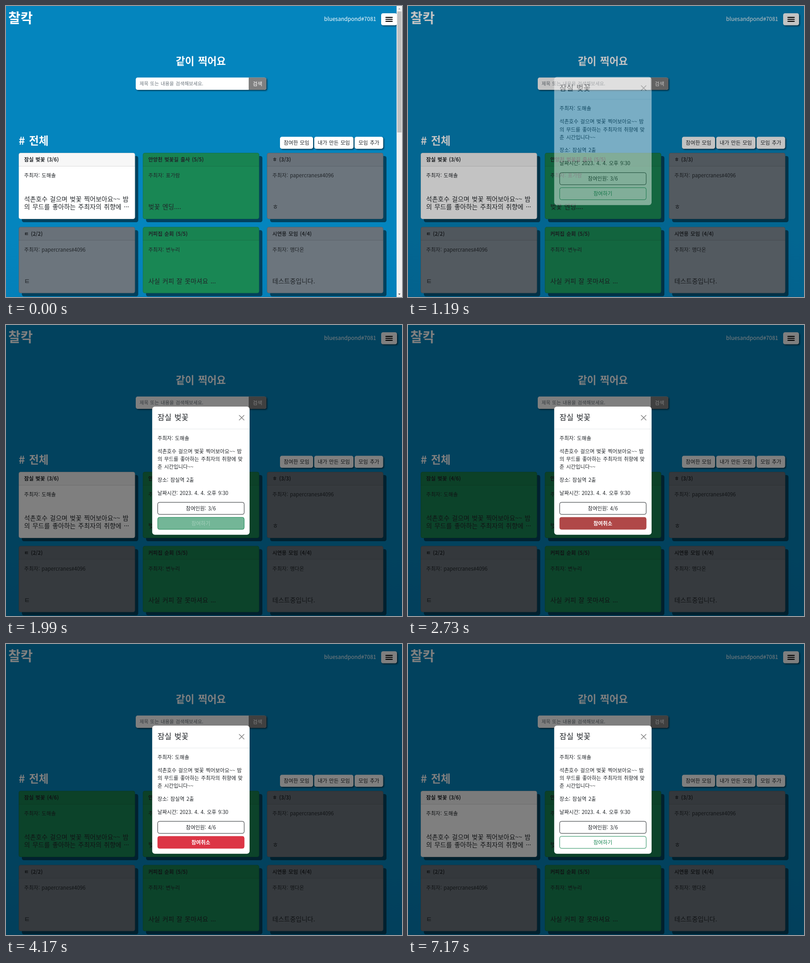
These frames come from a looping animation (873 px wide and 642 px high, 7.73 s). An HTML page:

```html
<!DOCTYPE html>
<html lang="ko">
<head>
<meta charset="utf-8">
<style>
  html, body { margin: 0; width: 100%; height: 100%; overflow: hidden; background: #0485be; }
  svg { display: block; width: 873px; height: 642px; }
  text { font-family: "Noto Sans CJK KR", "Noto Sans CJK", sans-serif; font-weight: 300; word-spacing: .1em; fill: #212529; }
  .bold { font-weight: 700; }
  .medium { font-weight: 600; }
  .white { fill: #fff; }
  .hint { fill: #6c757d; }
  .lifted { filter: drop-shadow(2px 2px 1.5px rgba(0, 0, 0, .55)); }
</style>
</head>
<body>
<svg id="stage" viewBox="0 0 873 642"></svg>
<script>
const LOOP = 7730, STEP = 70;
const GREEN = [25, 135, 84], RED = [220, 53, 69], DARK = [33, 37, 41], WHITE = [255, 255, 255];
const GREY_FILL = '#6c757d', GREEN_FILL = '#198754';
const SMALL = 11.3, BODY = 14;
const HOST = '도해솔', ME = 'bluesandpond#7081', FRIEND = 'papercranes#4096';
const $ = id => document.getElementById(id);

// y is the vertical centre of the glyphs
const text = (x, y, size, label, cls = '', anchor = 'start', id = '') =>
  `<text x="${x}" y="${y + size * .37}" font-size="${size}" text-anchor="${anchor}" class="${cls}" id="${id}">${label}</text>`;
const rect = (x, y, w, h, r, fill, extra = '') =>
  `<rect x="${x}" y="${y}" width="${w}" height="${h}" rx="${r}" fill="${fill}" ${extra}/>`;

const pill = (x, w, label) =>
  rect(x, 288.5, w, 26.5, 4.3, '#fff', 'class="lifted"') + text(x + w / 2, 301.5, SMALL, label, '', 'middle');

function card(x, y, fill, title, host, lines, id) {
  const body = lines.map((line, i) => text(x + 12, y + 119 - 17.5 * (lines.length - 1 - i), BODY, line)).join('');
  return rect(x + 7, y + 7, 256.5, 146, 4.5, 'rgba(0,0,0,.5)') +
    rect(x, y, 256.5, 146, 4.5, fill, `id="${id}Face"`) +
    `<path d="M${x} ${y + 29.5}v-25q0-4.5 4.5-4.5h247.5q4.5 0 4.5 4.5v25z" fill="rgba(0,0,0,.03)"/>` +
    rect(x, y + 29, 256.5, .75, 0, 'rgba(0,0,0,.176)') +
    rect(x + .4, y + .4, 255.7, 145.2, 4.1, 'none', 'stroke="rgba(0,0,0,.176)" stroke-width=".75"') +
    text(x + 12, y + 15, SMALL, title, 'medium', 'start', `${id}Title`) +
    text(x + 12, y + 50, SMALL, `주최자: ${host}`) + body;
}

const button = (id, y) =>
  rect(334.4, y, 190.7, 26.6, 4, '#fff', `id="${id}"`) +
  text(429.5, y + 13.3, SMALL, '', '', 'middle', `${id}Label`);

const backdrop = `<linearGradient id="sky" x2="0" y2="1"><stop offset=".8" stop-color="#0485be"/>
  <stop offset="1" stop-color="#0480b9"/></linearGradient>` + rect(0, 0, 873, 642, 0, 'url(#sky)');

const page = backdrop +
  text(5, 26, 29.3, '찰칵', 'bold white') +
  text(816, 29, 12, ME, 'white', 'end') +
  rect(827, 16, 35, 26.5, 4.3, '#fff', 'class="lifted"') +
  '<path d="M837.5 25.2h14M837.5 29.5h14M837.5 33.8h14" stroke="#000" stroke-width="2.2" stroke-linecap="round"/>' +
  text(429.5, 122, 22.2, '같이 찍어요', 'bold white', 'middle') +
  `<g class="lifted">${rect(286, 157.7, 288, 27.2, 4.3, '#fff')}<path d="M535 157.7h34.7q4.3 0 4.3 4.3v18.6q0 4.3-4.3 4.3h-34.7z" fill="#808080"/></g>` +
  text(294.5, 171.5, 10.5, '제목 또는 내용을 검색해보세요.', 'hint') +
  text(554.5, 171.5, SMALL, '검색', 'white', 'middle') +
  text(28, 297, 23.4, '# 전체', 'bold white') +
  pill(604, 73, '참여한 모임') + pill(679.5, 86.5, '내가 만든 모임') + pill(768.5, 63, '모임 추가') +
  card(28, 324, '#fff', '', HOST, ['석촌호수 걸으며 벚꽃 찍어보아요~~ 밤', '의 무드를 좋아하는 주최자의 취향에 ···'], 'first') +
  card(301.7, 324, GREEN_FILL, '안양천 벚꽃길 출사 (5/5)', '표가람', ['벚꽃 엔딩....']) +
  card(575.3, 324, GREY_FILL, 'ㅎ (3/3)', FRIEND, ['ㅎ']) +
  card(28, 487.5, GREY_FILL, 'ㅌ (2/2)', FRIEND, ['ㅌ']) +
  card(301.7, 487.5, GREEN_FILL, '커피집 순회 (5/5)', '변누리', ['사실 커피 잘 못마셔요 ...']) +
  card(575.3, 487.5, GREY_FILL, '시연용 모임 (4/4)', '맹다온', ['테스트중입니다.']);

const scrollbar = `<g id="scrollbar">${rect(861, 0, 12, 642, 0, '#f1f1f1')}${rect(862.5, 12, 9.5, 267, 0, '#c1c1c1')}
  <path d="M864.7 7.5l2.5-3 2.5 3z" fill="#a3a3a3"/><path d="M864.7 634.5l2.5 3 2.5-3z" fill="#505050"/></g>`;

const modal = `<g id="modal">` +
  rect(322.3, 180, 214.7, 282.7, 5.8, '#fff') +
  rect(322.5, 229, 214, .75, 0, '#dee2e6') +
  text(334, 204, 16.8, '잠실 벚꽃') +
  '<path d="M514.2 199.2l10.6 10.6m0-10.6l-10.6 10.6" stroke="#7f7f7f" stroke-width="1.4" stroke-linecap="round"/>' +
  [[249.5, `주최자: ${HOST}`], [278.5, '석촌호수 걸으며 벚꽃 찍어보아요~~ 밤'], [296, '의 무드를 좋아하는 주최자의 취향에 맞'],
   [313, '춘 시간입니다~~'], [341.5, '장소: 잠실역 2출'], [370.5, '날짜시간: 2023. 4. 4. 오후 9:30']]
    .map(([y, line]) => text(334, y, SMALL, line)).join('') +
  button('count', 391.2) + button('action', 424.3) + '</g>';

$('stage').innerHTML = page + scrollbar + rect(0, 0, 873, 642, 0, '#000', 'id="shade"') + modal + '<g id="tip"></g>';

function tooltip(names) {
  const width = names.includes(ME) ? 106 : 96, height = names.length * 15 + 6;
  return rect(329 - width, 404 - height / 2, width, height, 4.3, '#000') +
    '<path d="M329 399.7l4.3 4.3-4.3 4.3z"/>' +
    names.map((name, i) => text(329 - width / 2, 404.2 + 15 * (i - (names.length - 1) / 2), 10, name, 'white', 'middle')).join('');
}
const TIPS = [[FRIEND, HOST, '모루'], [ME, FRIEND, HOST, '모루']].map(tooltip);

const clamp = v => Math.max(0, Math.min(1, v));
const mix = (a, b, p) => a.map((v, i) => v + (b[i] - v) * p);
const rgb = c => `rgb(${c.map(Math.round)})`;

// Stepped hover transition of about 150 ms
function ramp(t, start, steps) {
  if (t < start) return 0;
  const p = clamp((Math.floor((t - start) / STEP) + 1) / steps);
  return 1 - (1 - p) ** 1.35;
}

function paintButton(id, label, color, fill) {
  $(id).setAttribute('fill', rgb(mix(WHITE, color, fill)));
  $(id).setAttribute('stroke', rgb(color));
  $(id + 'Label').textContent = label;
  $(id + 'Label').style.fill = rgb(mix(color, WHITE, fill));
  $(id + 'Label').style.fontWeight = fill > .9 ? 600 : 300;
}

let shownTip = -1;
function render(t) {
  const age = Math.floor((t - 1120) / STEP) * STEP;
  const open = t >= 1120, fade = clamp(age / 150);
  const lift = 36 * (1 - clamp(age / 300)) ** 1.6;
  $('scrollbar').style.display = open ? 'none' : '';
  $('shade').setAttribute('opacity', fade / 2);
  $('modal').setAttribute('opacity', fade);
  $('modal').setAttribute('transform', `translate(0 ${-lift})`);

  const joined = t >= 2660 && t < 4800, seats = joined ? '4/6' : '3/6';
  $('firstFace').setAttribute('fill', joined ? GREEN_FILL : '#fff');
  $('firstTitle').textContent = `잠실 벚꽃 (${seats})`;

  const overCount = ramp(t, 3120, 3) - ramp(t, 3960, 4) + ramp(t, 5220, 3) - ramp(t, 6960, 4);
  const overAction = ramp(t, 1990, 2) - ramp(t, 3120, 3) + ramp(t, 3960, 4) - ramp(t, 5220, 3);
  const redness = ramp(t, 2660, 3) - ramp(t, 4800, 3);
  paintButton('count', `참여인원: ${seats}`, DARK, overCount);
  paintButton('action', joined ? '참여취소' : '참여하기', mix(GREEN, RED, redness), overAction);

  if (shownTip !== +joined) $('tip').innerHTML = TIPS[shownTip = +joined];
  $('tip').setAttribute('opacity', overCount * .9);
}

function frame() {
  render(performance.now() % LOOP);
  requestAnimationFrame(frame);
}
frame();
</script>
</body>
</html>
```
